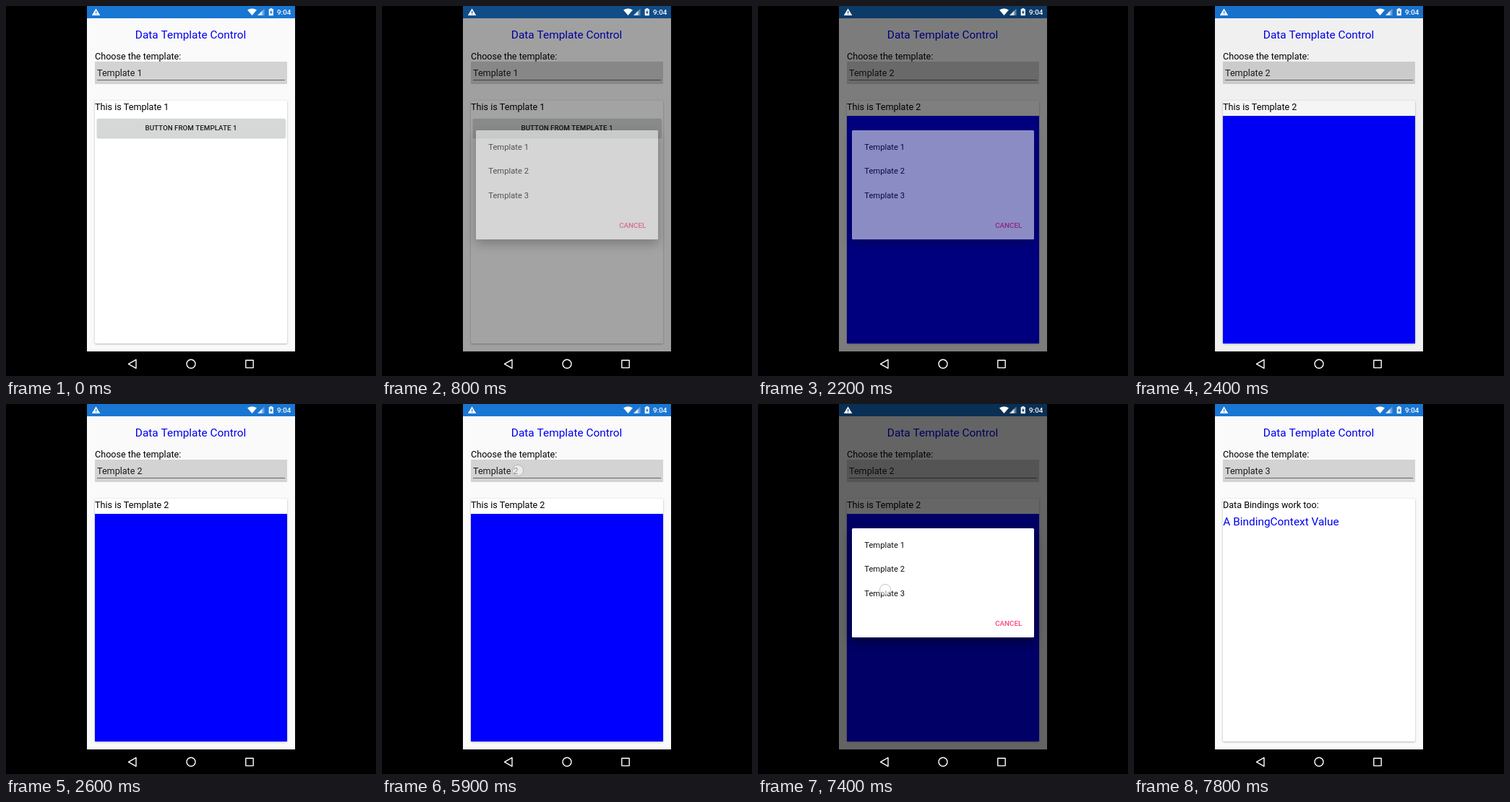
An HTML page with a canvas for the animation above (8 s loop, 512x512 px).

```html
<!DOCTYPE html>
<html lang="en">
<head>
<meta charset="utf-8">
<title>Data Template Control</title>
<style>
html, body { margin: 0; width: 100%; height: 100%; overflow: hidden; background: #000; }
canvas { display: block; width: 512px; height: 512px; }
</style>
</head>
<body>
<canvas id="stage"></canvas>
<script>
const SIZE = 512, LOOP = 8000;
const ratio = window.devicePixelRatio || 1;
const LINK = '#0000f0', PINK = '#ff4081';

// time, template, dialog opacity, screen dim, touch point
const STATES = [
  [0,    1, 0,   0],
  [500,  1, 0,   0, [188, 92]],
  [600,  1, 0,   0],
  [700,  1, .15, .12],
  [800,  1, .55, .36],
  [900,  1, .9,  .55],
  [1000, 1, 1,   .6],
  [1900, 1, 1,   .6, [176, 227]],
  [2000, 1, 1,   .6],
  [2100, 2, .9,  .58],
  [2200, 2, .55, .5],
  [2300, 2, .15, .22],
  [2400, 2, 0,   .04],
  [2600, 2, 0,   0],
  [5900, 2, 0,   0, [188, 92]],
  [6000, 2, 0,   0],
  [6200, 2, .15, .12],
  [6300, 2, .55, .36],
  [6400, 2, .9,  .55],
  [6500, 2, 1,   .6],
  [7400, 2, 1,   .6, [176, 257]],
  [7500, 2, 1,   .6],
  [7600, 3, .6,  .5],
  [7700, 3, .15, .2],
  [7800, 3, 0,   0]
];

function setup(canvas) {
  canvas.width = canvas.height = SIZE * ratio;
  const c = canvas.getContext('2d');
  c.scale(ratio, ratio);
  return c;
}

const ctx = setup(document.getElementById('stage'));
const dialog = document.createElement('canvas');
drawDialog(setup(dialog));

function rect(c, color, x, y, w, h) {
  c.fillStyle = color;
  c.fillRect(x, y, w, h);
}

function text(c, str, x, y, size, color = '#000', weight = 400, align = 'left') {
  c.font = `${weight} ${size}px Roboto, sans-serif`;
  c.textAlign = align;
  c.fillStyle = color;
  c.fillText(str, x, y);
}

function path(c, points) {
  c.beginPath();
  points.forEach(([x, y]) => c.lineTo(x, y));
  c.closePath();
}

function card(c, color, x, y, w, h, r, shade, blur, drop) {
  c.save();
  c.shadowColor = `rgba(0,0,0,${shade})`;
  c.shadowBlur = blur * ratio;
  c.shadowOffsetY = drop * ratio;
  c.fillStyle = color;
  c.beginPath();
  c.roundRect(x, y, w, h, r);
  c.fill();
  c.restore();
}

function drawDialog(c) {
  card(c, '#fff', 130, 172, 252, 151, 1.5, .45, 15, 6);
  for (let i = 1; i <= 3; i++) text(c, 'Template ' + i, 147.3, 165 + 33.6 * i, 11.2, '#111');
  text(c, 'CANCEL', 365.3, 307.3, 9.8, PINK, 500, 'right');
}

function drawPage(template) {
  rect(ctx, '#fafafa', 112, 0, 288, 478);
  rect(ctx, '#1976d2', 112, 0, 288, 17);
  text(ctx, 'Data Template Control', 255.6, 45, 15.4, LINK, 400, 'center');
  text(ctx, 'Choose the template:', 123, 73.5, 12.6);
  rect(ctx, '#d3d3d3', 123, 77, 266, 31);
  text(ctx, 'Template ' + template, 126, 97, 12.6, '#1c1c1c');
  rect(ctx, '#666', 126, 102, 260, 1);

  card(ctx, '#fff', 123, 131, 266, 336, 1.4, .32, 2.5, .8);
  text(ctx, template === 3 ? 'Data Bindings work too:' : 'This is Template ' + template, 123, 144, 12.6);
  if (template === 1) {
    card(ctx, '#d6d7d7', 126, 156, 260.5, 26, 1.4, .3, 2, .8);
    text(ctx, 'BUTTON FROM TEMPLATE 1', 256, 172.3, 9.8, '#1c1c1c', 500, 'center');
  } else if (template === 2) {
    rect(ctx, '#00f', 123, 152, 266, 315);
  } else {
    text(ctx, 'A BindingContext Value', 123.3, 168.3, 15.4, LINK);
  }
}

function drawStatus(dim) {
  const shade = 1 - dim;
  const bar = `rgb(${25 * shade},${118 * shade},${210 * shade})`;
  ctx.fillStyle = '#fff';
  path(ctx, [[124.5, 3.5], [130.3, 13], [118.8, 13]]);
  ctx.fill();
  rect(ctx, bar, 124, 7, 1.2, 3);
  rect(ctx, bar, 124, 10.8, 1.2, 1.1);

  ctx.fillStyle = '#fff';
  ctx.beginPath();
  ctx.moveTo(340.5, 13);
  ctx.lineTo(334, 5.5);
  ctx.quadraticCurveTo(340.5, 1.5, 347, 5.5);
  ctx.closePath();
  ctx.fill();

  ctx.fillStyle = 'rgba(255,255,255,.35)';
  path(ctx, [[348, 13], [357.5, 3.5], [357.5, 13]]);
  ctx.fill();
  ctx.fillStyle = 'rgba(255,255,255,.75)';
  path(ctx, [[348, 13], [354.5, 6.5], [354.5, 13]]);
  ctx.fill();

  rect(ctx, '#fff', 363.7, 4.2, 6.2, 9);
  rect(ctx, '#fff', 365.4, 3.2, 2.8, 1.2);
  ctx.fillStyle = bar;
  path(ctx, [[367.3, 5.3], [364.9, 9.2], [366.4, 9.2], [366.4, 12], [368.8, 8.1], [367.3, 8.1]]);
  ctx.fill();
  text(ctx, '9:04', 375, 12.3, 9.8, '#fff', 500);
}

function drawNav() {
  ctx.strokeStyle = '#fff';
  ctx.lineWidth = 1.4;
  ctx.lineJoin = 'round';
  path(ctx, [[169.5, 495.3], [180, 489.3], [180, 501.3]]);
  ctx.stroke();
  ctx.beginPath();
  ctx.arc(256, 495.3, 6, 0, Math.PI * 2);
  ctx.stroke();
  ctx.strokeRect(331.8, 490.2, 10.4, 10.4);
}

function drawTouch([x, y]) {
  ctx.beginPath();
  ctx.arc(x, y, 7.6, 0, Math.PI * 2);
  ctx.fillStyle = 'rgba(255,255,255,.55)';
  ctx.fill();
  ctx.strokeStyle = 'rgba(150,150,150,.55)';
  ctx.lineWidth = 1;
  ctx.stroke();
}

function draw(now) {
  const t = now % LOOP;
  const [, template, alpha, dim, touch] = STATES.filter(s => s[0] <= t).pop();
  rect(ctx, '#000', 0, 0, SIZE, SIZE);
  drawPage(template);
  rect(ctx, `rgba(0,0,0,${dim})`, 112, 0, 288, 478);
  // The area below the page also hides any shadow that spills over.
  rect(ctx, '#000', 112, 478, 288, 34);
  drawStatus(dim);
  drawNav();
  ctx.globalAlpha = alpha;
  ctx.drawImage(dialog, 0, 0, SIZE, SIZE);
  ctx.globalAlpha = 1;
  if (touch) drawTouch(touch);
}

const start = performance.now();
function tick() {
  draw(performance.now() - start);
  requestAnimationFrame(tick);
}
tick();
</script>
</body>
</html>
```
